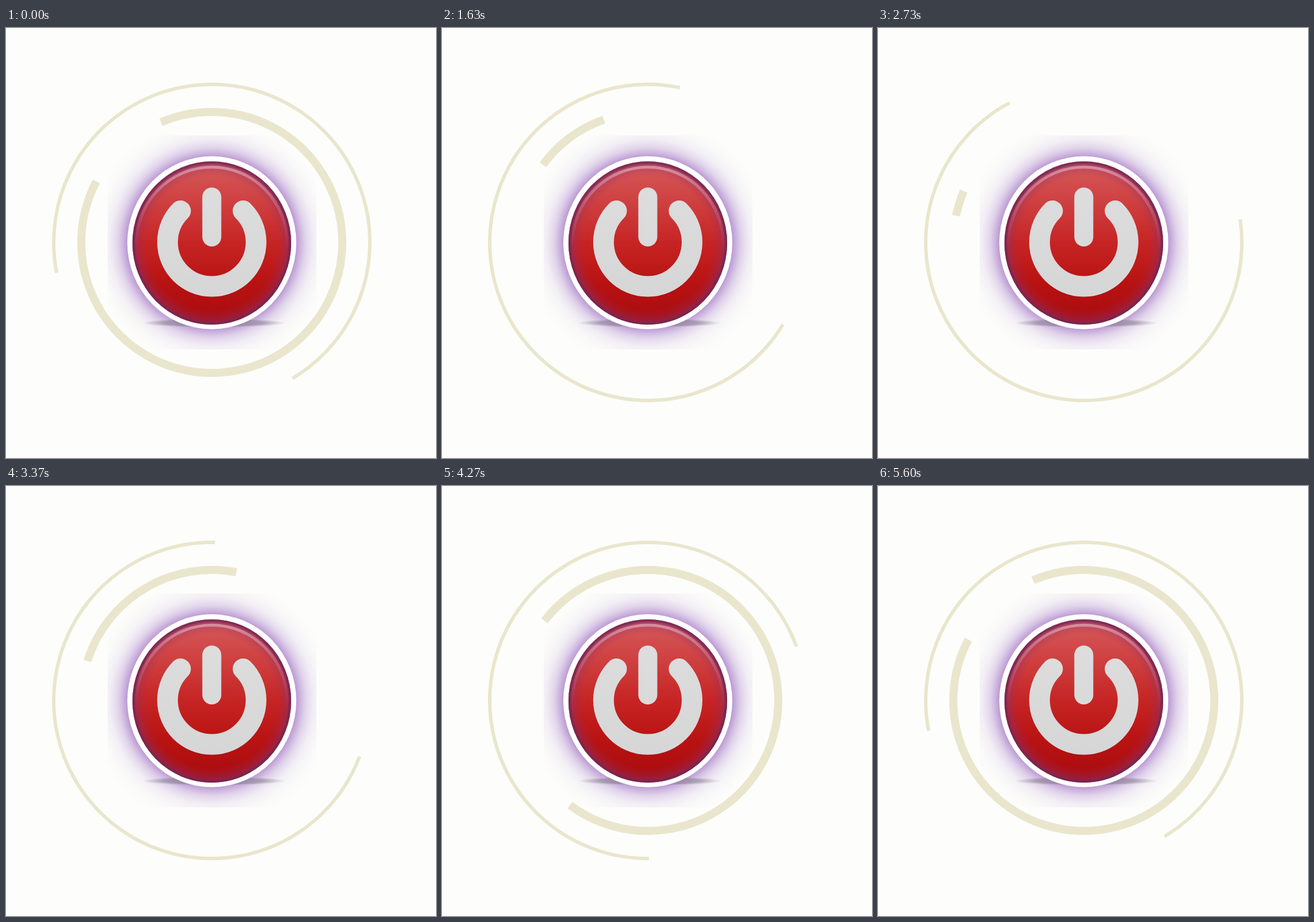
An HTML page that plays this animation: 748x748 px, repeating every 5.63 s.

```html
<!DOCTYPE html>
<html lang="en">
<head>
<meta charset="utf-8">
<title>Power button</title>
<style>
  html, body { margin: 0; width: 100%; height: 100%; overflow: hidden; background: #fdfdfb; }
  svg { display: block; width: 100vw; height: 100vh; }
  .ring { fill: none; stroke: #e9e6cd; }
  .sign { fill: none; stroke: url(#silver); stroke-linecap: round; }
</style>
</head>
<body>
<svg viewBox="0 0 748 748">
  <defs>
    <radialGradient id="glow">
      <stop offset=".64" stop-color="#8a4fb4" stop-opacity=".8"/>
      <stop offset=".70" stop-color="#9a68c0" stop-opacity=".58"/>
      <stop offset=".76" stop-color="#a67cc8" stop-opacity=".32"/>
      <stop offset=".83" stop-color="#b49ad0" stop-opacity=".15"/>
      <stop offset=".91" stop-color="#c4b8d8" stop-opacity=".06"/>
      <stop offset="1" stop-color="#d0c8e0" stop-opacity="0"/>
    </radialGradient>
    <radialGradient id="shade">
      <stop offset=".7" stop-color="#807888" stop-opacity=".55"/>
      <stop offset="1" stop-color="#908898" stop-opacity="0"/>
    </radialGradient>
    <linearGradient id="red" x2="0" y2="1">
      <stop offset="0" stop-color="#d65a5c"/>
      <stop offset=".25" stop-color="#cf4040"/>
      <stop offset=".5" stop-color="#c62424"/>
      <stop offset=".75" stop-color="#b81212"/>
      <stop offset="1" stop-color="#a80c10"/>
    </linearGradient>
    <radialGradient id="rim">
      <stop offset=".82" stop-color="#8c3068" stop-opacity="0"/>
      <stop offset=".92" stop-color="#8c3068" stop-opacity=".3"/>
      <stop offset="1" stop-color="#7c2c62" stop-opacity=".8"/>
    </radialGradient>
    <linearGradient id="shine" x2="0" y2="1">
      <stop offset="0" stop-color="#e0a4b4" stop-opacity=".75"/>
      <stop offset=".3" stop-color="#d08098" stop-opacity=".35"/>
      <stop offset=".55" stop-color="#c06080" stop-opacity="0"/>
    </linearGradient>
    <linearGradient id="silver" gradientUnits="userSpaceOnUse" x1="0" y1="277" x2="0" y2="467">
      <stop offset="0" stop-color="#dddddd"/>
      <stop offset="1" stop-color="#d6d6d6"/>
    </linearGradient>
  </defs>

  <path id="outer" class="ring" stroke-width="6"/>
  <path id="inner" class="ring" stroke-width="14"/>

  <svg x="177" y="187" width="363" height="372" viewBox="177 187 363 372">
    <ellipse cx="358" cy="373.5" rx="215" ry="218" fill="url(#glow)"/>
    <ellipse cx="361" cy="513" rx="125" ry="8" fill="url(#shade)"/>
  </svg>

  <ellipse cx="358" cy="373.5" rx="147" ry="150.5" fill="#fff"/>
  <ellipse cx="358" cy="374" rx="138" ry="142" fill="url(#red)"/>
  <ellipse cx="358" cy="374" rx="138" ry="142" fill="url(#rim)"/>
  <ellipse cx="358" cy="374" rx="136" ry="140" fill="none" stroke="#74264f" stroke-opacity=".6" stroke-width="4"/>
  <ellipse cx="358" cy="375" rx="131" ry="133" fill="none" stroke="url(#shine)" stroke-width="5"/>

  <path class="sign" stroke-width="36" d="M303.6 318A77 77 0 1 0 412.4 318"/>
  <path class="sign" stroke-width="33" d="M358 294V363.500"/>
</svg>
<script>
const LOOP = 5630, REST = 5600;
const CX = 358, CY = 373;
const OUTER_SWEEP = 250.4;

// [time, degrees clockwise from the top]
const outerStart = [
  [0, 258.9], [300, 244], [570, 221], [870, 193.6], [1130, 171], [1630, 121.4],
  [1730, 111.5], [2330, 87.5], [2730, 81.6], [2930, 85], [3370, 110.7], [3530, 122],
  [4130, 170.7], [4270, 179.6], [4730, 185.5], [5330, 240], [REST, 258.9]
];
const innerSweep = [
  [0, 320.7], [870, 225.2], [1630, 33.8], [2250, 8], [2730, 11.3],
  [3370, 83.1], [4270, 269], [REST, 320.7]
];
const innerStart = [
  [0, 337.1], [136, 340.1], [2920, 277.6], [REST, 337.1]
];

const slope = (a, b) => (b[1] - a[1]) / (b[0] - a[0]);

// Harmonic mean of the neighbouring slopes, flat at turning points and ends.
function tangent(keys, i) {
  if (!i || i === keys.length - 1) return 0;
  const a = slope(keys[i - 1], keys[i]), b = slope(keys[i], keys[i + 1]);
  return a * b > 0 ? 2 * a * b / (a + b) : 0;
}

function segment(keys, t) {
  let i = 0;
  while (i < keys.length - 2 && t >= keys[i + 1][0]) i++;
  return i;
}

function linear(keys, t) {
  const k = keys[segment(keys, t)], n = keys[segment(keys, t) + 1];
  return k[1] + slope(k, n) * (t - k[0]);
}

function smooth(keys, t) {
  const i = segment(keys, t);
  const [t0, v0] = keys[i], [t1, v1] = keys[i + 1];
  const d = t1 - t0, u = (t - t0) / d, w = 1 - u;
  return v0 * w * w * (1 + 2 * u) + v1 * u * u * (3 - 2 * u)
    + d * u * w * (w * tangent(keys, i) - u * tangent(keys, i + 1));
}

function point(r, deg) {
  const a = deg * Math.PI / 180;
  return `${(CX + r * Math.sin(a)).toFixed(2)} ${(CY - r * Math.cos(a)).toFixed(2)}`;
}

function arc(id, r, start, sweep) {
  document.getElementById(id).setAttribute("d",
    `M${point(r, start)}A${r} ${r} 0 ${sweep > 180 ? 1 : 0} 1 ${point(r, start + sweep)}`);
}

function draw(now) {
  const t = Math.min(now % LOOP, REST);
  arc("outer", 275, smooth(outerStart, t), OUTER_SWEEP);
  arc("inner", 227, linear(innerStart, t), smooth(innerSweep, t));
}

const begin = performance.now();
function tick() {
  draw(performance.now() - begin);
  requestAnimationFrame(tick);
}
tick();
</script>
</body>
</html>
```
